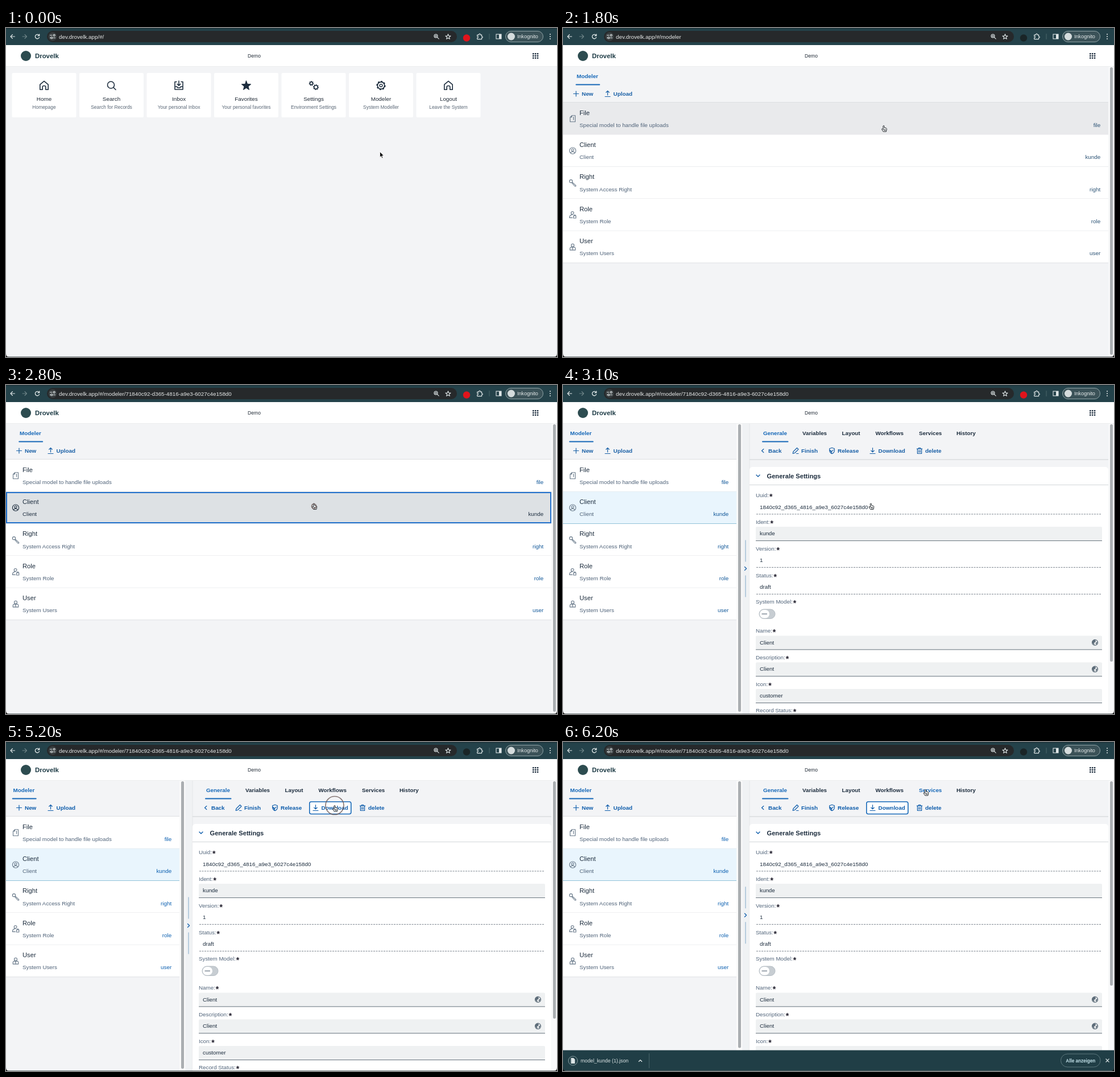
Recreate the animation shown at these times as an HTML page. Size 969 px wide and 578 px high, loop 6.3 s.

```html
<!DOCTYPE html>
<html lang="en">
<head>
<meta charset="utf-8">
<title>Modeler demo</title>
<style>
  html, body { margin: 0; width: 100%; height: 100%; overflow: hidden; background: #f3f4f6; }
  svg { display: block; width: 969px; height: 578px; font-family: "Liberation Sans", Arial, sans-serif; }
</style>
</head>
<body>
<svg id="stage" viewBox="0 0 969 578"></svg>
<script>
const LOOP = 6300, STEP = 100;
const OPEN_URL = 1000, LIST = 1200, PRESS = 2700, SPLIT = 3100, DOWNLOAD = 5000, SHELF = 5500;
const INK = '#1d2d3e', MUTED = '#51647a', BLUE = '#1668b8', LINE = '#dfe2e5', PAGE = '#f3f4f6', BAR = '#24424a';
const HOST = 'dev.drovelk.app/#/';
const ID = '71840c92-d365-4816-a9e3-6027c4e158d0';

// Pointer path: time, x, y of the hot spot
const PATH = [
  [0, 657.5, 217.5], [100, 658, 206], [200, 660, 172], [300, 662, 142], [400, 661.5, 128.5], [600, 661.5, 128.5],
  [700, 662.3, 129.3], [1200, 662.3, 129.3], [1600, 567, 168], [1800, 564, 171.5], [2200, 541.5, 208],
  [3300, 541.5, 208], [4000, 529.5, 132], [4200, 560, 121], [4400, 560, 121], [4600, 578, 111.5],
  [5600, 578, 111.5], [6200, 637.5, 83.5], [6300, 637.5, 83.5]
];
const CLICKS = [1000, 2800, 5000];

const ICONS = {
  home: 'M-7.2 7.2V-1.6L0-7.6L7.2-1.6V7.2H2.8V2.2Q2.8 .5 0 .5T-2.8 2.2V7.2Z',
  search: 'M5-1A6 6 0 1 1-7-1A6 6 0 1 1 5-1M3.5 3.5L7.5 7.5',
  inbox: 'M-4-6.5H-7V7H7V-6.5H4M0-8V0M-3-2.7L0 .3L3-2.7M-7 2H-3.4L-2 4H2L3.4 2H7',
  plus: 'M-4.5 0H4.5M0-4.5V4.5',
  upload: 'M-4.5 5H4.5M0 2.5V-5M-2.8-2.3L0-5L2.8-2.3',
  download: 'M-4.5 5H4.5M0-5V2.3M-2.8-.4L0 2.3L2.8-.4',
  left: 'M1.8-3L-1.5 0L1.8 3',
  right: 'M-1.5-3L1.6 0L-1.5 3',
  down: 'M-3-1.5L0 1.6L3-1.5',
  up: 'M-2.6 1.3L0-1.3L2.6 1.3',
  close: 'M-2.6-2.6L2.6 2.6M2.6-2.6L-2.6 2.6',
  pencil: 'M-4.8 4.8L-4 1.5L2.5-5L5-2.5L-1.5 4ZM1.5 5H5',
  shield: 'M0-5.2L4.3-3.8V0Q4 3.6 0 5.2Q-4-3.6-4.3 0V-3.8ZM-4.3-.2Q-4 3.6 0 5.2M-2-.2L-.4 1.4L2.2-1.4',
  trash: 'M-4.6-3.3H4.6M-1.6-3.3V-5H1.6V-3.3M-3.6-3.3V5H3.6V-3.3M-1.2-1V3M1.2-1V3',
  file: 'M-4.5 5.5V-2.5L-1.5-5.5H4.5V5.5ZM-1.5-5.5V-2.5H-4.5M1.5-3V2',
  client: 'M5.6 0A5.6 5.6 0 1 1-5.6 0A5.6 5.6 0 1 1 5.6 0M2-1.4A2 2 0 1 1-2-1.4A2 2 0 1 1 2-1.4M-3.6 4Q-3 1.6 0 1.6T3.6 4',
  key: 'M-.4-2.8A2.6 2.6 0 1 1-5.6-2.8A2.6 2.6 0 1 1-.4-2.8M-1-1.4L5.6 4.6V6H3.8L-2-.6',
  role: 'M2-3.4A2.4 2.4 0 1 1-2.8-3.4A2.4 2.4 0 1 1 2-3.4M-.5 5H-5.6Q-5.4 0-1-.2M1.5 1.6H5.8V5.6H1.5ZM2.4 1.6V.2H4.9V1.6',
  user: 'M2.5-3A2.5 2.5 0 1 1-2.5-3A2.5 2.5 0 1 1 2.5-3M-4.8 5.4V3Q-4.6 .2-1.8 0L0 2L1.8 0Q4.6 .2 4.8 3V5.4ZM0 2V5',
  back: 'M4 0H-3.5M0-3.5L-3.5 0L0 3.5',
  forward: 'M-4 0H3.5M0-3.5L3.5 0L0 3.5',
  reload: 'M3.4-1.6A3.7 3.7 0 1 0 3.5 1.4M3.7-4V-1.3H1',
  tune: 'M-4.5-2.2H-1M-4.5 2.3H-3M1 2.3H4.5M4.2-2.2A1.5 1.5 0 1 1 1.2-2.2A1.5 1.5 0 1 1 4.2-2.2M-.2 2.3A1.5 1.5 0 1 1-3.2 2.3A1.5 1.5 0 1 1-.2 2.3',
  zoom: 'M2-1A3 3 0 1 1-4-1A3 3 0 1 1 2-1M1.2 1.2L4.2 4.2M-2.5-1H.5M-1-2.5V.5',
  puzzle: 'M-4.2-2.8H-1.4Q-1.4-5 0-5T1.4-2.8H3.6V0Q5.4 0 5.4 1T3.6 2.2V4.6H-4.2V2Q-2.4 2-2.4 .8T-4.2-.2Z',
  globe: 'M5 0A5 5 0 1 1-5 0A5 5 0 1 1 5 0'
};

const rect = (x, y, w, h, fill, extra = '') => `<rect x="${x}" y="${y}" width="${w}" height="${h}" fill="${fill}" ${extra}/>`;
const circle = (x, y, r, fill, extra = '') => `<circle cx="${x}" cy="${y}" r="${r}" fill="${fill}" ${extra}/>`;
const text = (x, y, size, str, fill = INK, extra = '') =>
  `<text x="${x}" y="${y + size * .35}" font-size="${size}" fill="${fill}" ${extra}>${str}</text>`;
const BOLD = 'font-weight="700"', MID = 'text-anchor="middle"', END = 'text-anchor="end"';
const path = (d, x, y, stroke, width = 1.1, fill = 'none') =>
  `<path d="${d}" transform="translate(${x} ${y})" fill="${fill}" stroke="${stroke}" stroke-width="${width}" stroke-linejoin="round" stroke-linecap="round"/>`;
const icon = (name, x, y, color, width) => path(ICONS[name], x, y, color, width);

function star(r, inner) {
  const points = Array.from({ length: 10 }, (_, i) => {
    const a = i * Math.PI / 5, q = i % 2 ? inner : r;
    return `${(q * Math.sin(a)).toFixed(2)} ${(-q * Math.cos(a)).toFixed(2)}`;
  });
  return `M${points.join('L')}Z`;
}

function gear(x, y, r, teeth, width) {
  const tooth = 2 * Math.PI * (r + 1) / teeth / 2;
  return circle(x, y, r, 'none', `stroke="${INK}" stroke-width="${width}"`) +
    circle(x, y, r + 1.1, 'none', `stroke="${INK}" stroke-width="${width}" stroke-dasharray="${tooth}"`);
}

function browserBar(t) {
  const pale = '#dfe6e7';
  const alert = t < OPEN_URL || (t >= PRESS && t < DOWNLOAD);
  const url = HOST + (t < OPEN_URL ? '' : 'modeler') + (t < PRESS ? '' : '/' + ID);
  return rect(0, 0, 969, 30, BAR) + rect(0, 0, 969, 1.5, '#1b3238') +
    icon('back', 11.5, 15, pale) + icon('forward', 33, 15, '#6f8488') + icon('reload', 55, 15, pale, 1.3) +
    rect(72, 5, 721, 20, '#26292b', 'rx="10"') + circle(82, 15, 7.5, '#3a3f41') + icon('tune', 82, 15, pale) +
    text(93, 15.2, 9.8, url, '#e8eaea') +
    icon('zoom', 757, 15, pale) + path(star(4.8, 2), 777.5, 15.5, pale) +
    circle(810, 17.5, 6.2, alert ? '#e0141c' : '#1a2527') + icon('puzzle', 833, 15, pale, 1.2) +
    rect(849.5, 10, 1, 10, '#4b666b') +
    rect(862, 11, 9, 8, 'none', `stroke="${pale}" stroke-width="1.1"`) + rect(867, 11, 4, 8, pale) +
    rect(878.5, 5.5, 66, 19, '#3b5258', 'rx="9.5" stroke="#8fa3a6" stroke-width="1"') +
    circle(888.5, 15, 6.5, '#d5dcdd') + text(899, 15, 9.1, 'Inkognito', '#e6ebeb') +
    [-4, 0, 4].map(d => circle(957, 15 + d, 1, pale)).join('');
}

function appHeader() {
  let dots = '';
  for (let i = 0; i < 9; i++) dots += rect(926 + i % 3 * 3.9, 44 + Math.floor(i / 3) * 3.7, 2.5, 2.5, INK, 'rx=".6"');
  return rect(0, 30, 969, 37, '#fff') + rect(0, 67, 969, 1, '#eceeef') +
    circle(35, 49, 9, '#2d4c50') + text(51, 48.6, 11.4, 'Drovelk', '#1c3a44', BOLD) +
    text(425, 48.5, 8.6, 'Demo', '#222c38') + dots;
}

const TILES = [
  ['Home', 'Homepage'], ['Search', 'Search for Records'], ['Inbox', 'Your personal Inbox'],
  ['Favorites', 'Your personal favorites'], ['Settings', 'Environment Settings'],
  ['Modeler', 'System Modeller'], ['Logout', 'Leave the System']
];
function tileIcon(i, x) {
  if (i === 3) return path(star(8.6, 3.7), x, 101.5, INK, 1, INK);
  if (i === 4) return gear(x - 4, 97.3, 2.5, 7, 1.4) + gear(x + 4, 104, 3.2, 8, 1.5);
  if (i === 5) return gear(x, 101, 6.2, 8, 1.7) + circle(x, 101, 2.4, 'none', `stroke="${INK}" stroke-width="1.4"`);
  return icon(['home', 'search', 'inbox'][i % 6], x, 101, INK, 1.6);
}
function homePage(pointer) {
  return TILES.map(([title, sub], i) => {
    const x = 67 + i * 118.5;
    const hover = Math.abs(pointer.x - x) < 56.5 && pointer.y > 79 && pointer.y < 157;
    return rect(x - 56.5, 79, 113, 78, hover ? '#dbe0e4' : '#fff', 'rx="2"') + tileIcon(i === 6 ? 0 : i, x) +
      text(x, 124.7, 9.9, title, '#222c38', MID) + text(x, 139, 8.45, sub, '#5b6877', MID);
  }).join('');
}

const ROWS = [
  ['File', 'Special model to handle file uploads', 'file', 'file'], ['Client', 'Client', 'kunde', 'client'],
  ['Right', 'System Access Right', 'right', 'key'], ['Role', 'System Role', 'role', 'role'],
  ['User', 'System Users', 'user', 'user']
];
function linkColor(t) {
  if (t < PRESS) return '#2c5375';
  if (t < 3400) return '#0f5698';
  return t < DOWNLOAD ? '#245a70' : '#0a5fb0';
}
function buttonColor(t) {
  if (t < 3400) return '#185fa6';
  return t < DOWNLOAD ? '#1d5674' : '#0d5cab';
}
const thumb = (x, bottom) => rect(x, 69, 5, bottom - 69, '#aaaeb1', 'rx="2.5"');
const button = (name, x, label, color) => icon(name, x, 115.5, color, 1.2) + text(x + 10, 115.7, 9.9, label, color, BOLD);

function listPage(t, pointer) {
  const split = t >= SPLIT, width = split ? 305 : 959, color = buttonColor(t), tab = split ? 12.5 : 24;
  const rows = ROWS.map(([title, sub, link, name], i) => {
    const y = 131 + i * 56.35, chosen = i === 1 && t >= PRESS;
    const hover = !split && pointer.y + 4 > y && pointer.y + 4 < y + 56.35;
    const fill = chosen ? (split ? '#e9f5fd' : '#dde1e4') : hover ? '#e9eaec' : '#fff';
    const dark = chosen && !split;
    return rect(0, y, width, 56.35, fill) + rect(0, y + 55.8, width, 1, chosen && split ? '#4a9cc0' : LINE) +
      (dark ? rect(1, 189, 957, 53, 'none', 'stroke="#2271cc" stroke-width="2"') : '') +
      icon(name, 17, y + 28.3, dark ? INK : '#667788', 1.1) +
      text(29, y + 17.6, 11.2, title) + text(29, y + 39.4, 9.8, sub, dark ? INK : MUTED) +
      text(width - 13.7, y + 39.4, 9.9, link, dark ? INK : linkColor(t), END);
  }).join('');
  return rect(0, 68, 969, 510, PAGE) + text(tab, 84.5, 9.9, 'Modeler', BLUE, BOLD) +
    rect(tab - 1.8, 98.5, 43, 2, BLUE, 'rx="1"') +
    button('plus', 23, 'New', color) + button('upload', 78.5, 'Upload', color) +
    rect(0, 130.3, width, 1, '#d5d8db') + rows;
}

const TABS = [['Generale', 352], ['Variables', 421], ['Layout', 490.5], ['Workflows', 549.5], ['Services', 626], ['History', 692]];
const TOOLS = [['left', 351, 'Back'], ['pencil', 409, 'Finish'], ['shield', 473, 'Release'], ['download', 544.5, 'Download'], ['trash', 627, 'delete']];
// label, label centre, value, kind of field
const FIELDS = [
  ['Uuid', 193.5, ID.slice(1).replaceAll('-', '_'), 'plain'], ['Ident', 240.3, 'kunde', 'box'],
  ['Version', 287, '1', 'plain'], ['Status', 334, 'draft', 'plain'], ['System Model', 380.7, '', 'toggle'],
  ['Name', 431.6, 'Client', 'globe'], ['Description', 478.4, 'Client', 'globe'],
  ['Icon', 525.2, 'customer', 'box'], ['Record Status', 571.6, '', '']
];

function field([label, y, value, kind]) {
  let out = `<text x="339" y="${y + 3.5}" font-size="9.8" fill="${MUTED}">${label}:<tspan font-weight="700" font-size="14" fill="#22202e" dx="1" dy="4">*</tspan></text>`;
  if (kind === 'box' || kind === 'globe')
    out += rect(339, y + 8.8, 609, 24.5, '#eff1f2', 'rx="2"') + rect(339, y + 32.8, 609, 1, '#66727c');
  if (kind === 'plain')
    out += `<path d="M340 ${y + 33.4}H946" stroke="#7c858e" stroke-width="1" stroke-dasharray="3 1.5"/>`;
  if (kind === 'globe')
    out += icon('globe', 935.5, y + 20.8, '#5d6c79', 1.2) +
      path('M-4-3L-1-4.6L1.5-3L0-.5L-2 .5L-1 4Q-4.5 2-4.6-1ZM4.5-1L2 0L1.5 2L2.8 3.5', 935.5, y + 20.8, '#5d6c79', .5, '#5d6c79');
  if (kind === 'toggle')
    out += rect(345, 394, 28, 16.5, '#c7cdd2', 'rx="8.2" stroke="#b4bcc3"') + rect(346, 395, 17, 14.5, '#fff', 'rx="7.2"') +
      rect(349.5, 401.6, 9.5, 1.3, '#6d7b88');
  return out + text(346, y + 20.6, 9.85, value);
}

function detailPanel(t, pointer, bottom) {
  const color = buttonColor(t), middle = (67 + bottom) / 2;
  const onService = t >= SHELF && pointer.x > 624 && pointer.y < 92;
  const overDownload = t >= 4100 && t < DOWNLOAD && pointer.x > 533 && pointer.y < 127;
  const rail = y => rect(320.5, y, 1, 38, '#7fa5c6');
  return rect(305, 68, 10.5, 510, '#fafafa') + thumb(308, bottom - 4) +
    rect(315.5, 68, 12, 510, '#f0f2f4') + rail(middle - 50) + rail(middle + 12) + icon('right', 321, middle, color, 1.3) +
    rect(327.5, 68, 632, 510, PAGE) + rect(327.5, 68, 1, 510, '#e3e6e8') +
    TABS.map(([name, x], i) => text(x, 84.5, 9.8, name, i === 0 || (i === 4 && onService) ? BLUE : INK, BOLD)).join('') +
    rect(350, 98.5, 46.5, 2, BLUE, 'rx="1"') + rect(328, 130.5, 631, 1, '#cfd3d6') +
    (t >= DOWNLOAD ? rect(533.8, 105, 73, 21.5, '#fff', `rx="3" stroke="${BLUE}" stroke-width="1.6"`) : '') +
    (overDownload ? rect(534, 105, 73, 21.5, '#e6edf3', 'rx="3"') : '') +
    TOOLS.map(([name, x, label]) => button(name, x, label, color)).join('') +
    rect(328, 144, 631, 440, '#fff', 'rx="5"') + rect(328, 175, 631, 1, '#d3d7da') +
    icon('down', 343, 159.5, color, 1.4) + text(358.5, 159.6, 11.15, 'Generale Settings', INK, BOLD) +
    FIELDS.map(field).join('');
}

function downloadShelf() {
  const pale = '#dde5e6';
  return rect(0, 541.5, 969, 37, '#203e46') + circle(17.5, 560, 8, 'none', 'stroke="#8ba0a4" stroke-width="1"') +
    path('M-3-4.5H1L3.2-2.3V4.5H-3Z', 17.5, 560, pale, .8, pale) +
    text(31, 560.3, 8.75, 'model_kunde (1).json', pale) + icon('up', 136, 560, pale, 1.3) +
    rect(151, 547, 1, 26, '#48646a') +
    rect(875.5, 548, 69.5, 23, 'none', 'rx="11.5" stroke="#5c777c" stroke-width="1"') +
    text(910.3, 559.7, 8.15, 'Alle anzeigen', '#c3e2ea', MID + ' ' + BOLD) + icon('close', 957.5, 559.5, pale, 1.3);
}

function pointerAt(t) {
  const i = PATH.findIndex(key => key[0] > t);
  const [t0, x0, y0] = PATH[i - 1], [t1, x1, y1] = PATH[i];
  const p = (t - t0) / (t1 - t0);
  return { x: x0 + (x1 - x0) * p, y: y0 + (y1 - y0) * p };
}

function drawPointer(t, { x, y }) {
  const hand = (t >= 1500 && t < 3400) || t >= 4100;
  const start = CLICKS.find(c => t >= c && t <= c + 200);
  const ring = start === undefined ? '' :
    circle(x, y + (start === DOWNLOAD ? 0 : 5), 4 + (t - start) * .06, 'none', 'stroke="#6d5a58" stroke-opacity=".8" stroke-width="1.7"');
  const shape = hand
    ? path('M-1 .5Q0-.8 .9 .5V3.6L4.4 4.4Q5.6 4.8 5.2 6.5L4.4 10.5H-.8L-3.3 6.8Q-3.6 5.3-2.4 5.6L-1 6.8ZM1 8.8V6.6M2.8 8.8V6.6', x, y, '#20262b', 1, '#fff')
    : path('M0 0V9.6L2.2 7.7L3.8 11.2L5.4 10.5L3.9 7.1H6.9Z', x, y, '#fff', .8, '#0d0f10');
  return shape + ring;
}

const windowEdge = rect(0, 577.2, 969, .8, '#5f676a') +
  '<path d="M0 572V578H6Q0 578 0 572M969 572V578H963Q969 578 969 572" fill="#111"/>';

function scene(t) {
  const pointer = pointerAt(t), shelf = t >= SHELF, bottom = shelf ? 541.5 : 578;
  let out = rect(0, 0, 969, 578, PAGE);
  if (t < LIST) out += homePage(pointer);
  else {
    out += listPage(t, pointer);
    if (t >= SPLIT) out += detailPanel(t, pointer, bottom);
    out += rect(959.5, 68, 9.5, 510, '#f9f9fa') + thumb(962, t < SPLIT ? 574 : shelf ? 428 : 486);
  }
  return out + browserBar(t) + appHeader() + (shelf ? downloadShelf() : '') + windowEdge + drawPointer(t, pointer);
}

const stage = document.getElementById('stage');
const began = performance.now();
let shown = -1;
function tick() {
  const t = Math.floor((performance.now() - began) % LOOP / STEP) * STEP;
  if (t !== shown) stage.innerHTML = scene(shown = t);
  requestAnimationFrame(tick);
}
tick();
</script>
</body>
</html>
```
